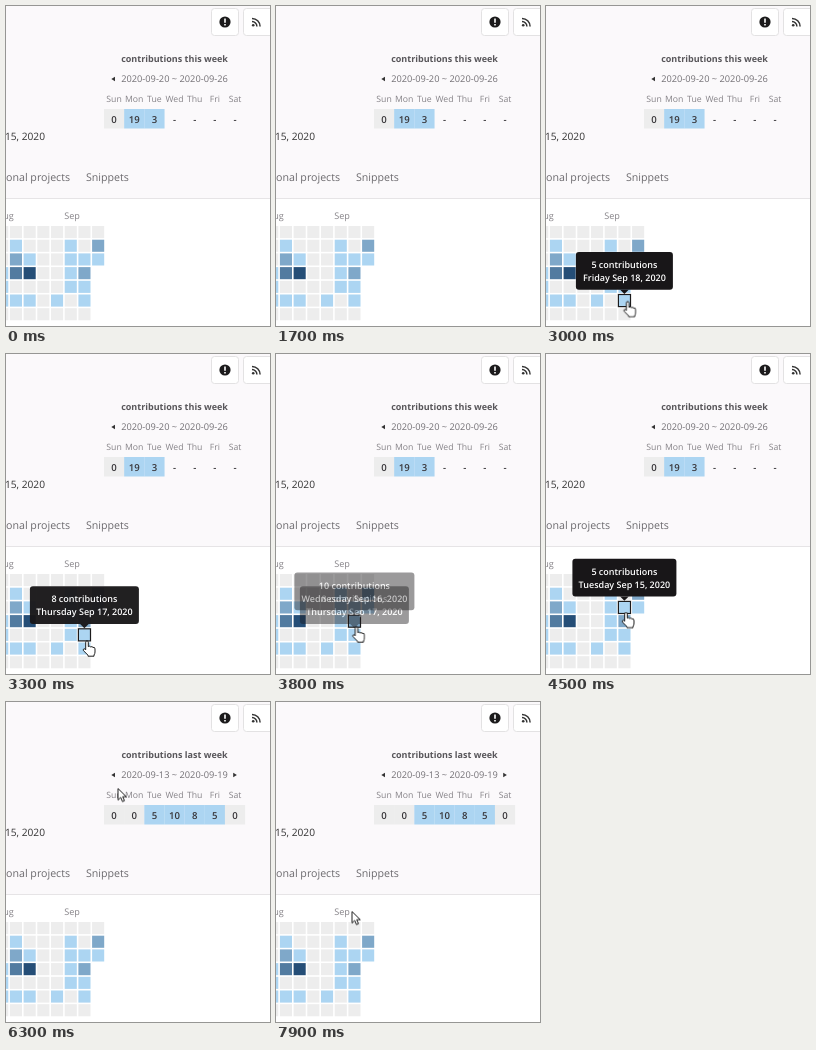
An HTML page for the animation above (8 s loop, 264 px wide and 320 px high).

```html
<!DOCTYPE html>
<html lang="en">
<head>
<meta charset="utf-8">
<title>Contribution calendar</title>
<style>
  html, body { margin: 0; width: 100%; height: 100%; overflow: hidden; background: #fff; }
  svg { display: block; width: 264px; height: 320px; }
  text { font-family: "Open Sans", "Noto Sans", sans-serif; text-rendering: geometricPrecision; }
  .button { fill: #fff; stroke: #e3e2e3; }
  .title { font-size: 9px; font-weight: 700; fill: #58565a; }
  .range { font-size: 9.25px; fill: #737075; }
  .day { font-size: 8.7px; fill: #858287; }
  .count { font-size: 9.6px; font-weight: 600; fill: #38363a; }
  .date { font-size: 10.2px; fill: #333; }
  .tab { font-size: 10.65px; fill: #6c6a6e; }
  .month { font-size: 9.1px; fill: #858287; }
  .tip { font-size: 9px; font-weight: 600; fill: #fff; }
  .mid { text-anchor: middle; }
  .end { text-anchor: end; }
  .pointer path { fill: #fff; stroke: #111; stroke-width: .95; stroke-linejoin: round; }
</style>
</head>
<body>
<svg id="stage" viewBox="0 0 264 320">
  <rect width="264" height="192" fill="#fbf9fb"/>
  <path d="M0 192.5H264" stroke="#e6e4e6"/>

  <rect class="button" x="205.5" y="2.5" width="27" height="27" rx="3"/>
  <rect class="button" x="237.5" y="2.5" width="30" height="27" rx="3"/>
  <circle cx="219" cy="16" r="5.6" fill="#1c1b1c"/>
  <path d="M219 12.6V16.8M219 18V19.6" stroke="#fff" stroke-width="1.6"/>
  <circle cx="247.2" cy="19.2" r="1.3" fill="#333"/>
  <path d="M246 15.6a4.9 4.9 0 0 1 4.9 4.9M246 12.4a8.1 8.1 0 0 1 8.1 8.1" fill="none" stroke="#333" stroke-width="1.5"/>

  <path d="M105.3 73L109 70.8V75.2z" fill="#333"/>
  <text class="date end" x="39" y="134">15, 2020</text>
  <text class="tab end" x="64" y="174.6">Personal projects</text>
  <text class="tab" x="80" y="174.6">Snippets</text>
  <text class="month end" x="7.8" y="213">Aug</text>
  <text class="month" x="58.2" y="213">Sep</text>
</svg>
<script>
const LOOP = 8000;
const PITCH = 13.7, CELL = 12.1, GRID_LEFT = -9.8, GRID_TOP = 220;
const SHADES = ['#ededed', '#acd5f2', '#7fa8c9', '#527ba0', '#254e77'];
const stage = document.getElementById('stage');

function add(parent, tag, attrs = {}, text = '') {
  const node = document.createElementNS('http://www.w3.org/2000/svg', tag);
  for (const key in attrs) node.setAttribute(key, attrs[key]);
  node.textContent = text;
  return parent.appendChild(node);
}

const label = (parent, cls, x, y, text) =>
  add(parent, 'text', { class: cls + ' mid', x, y }, text);

// Each stop is [ms, value, steps taken on the way to the next stop].
function track(node, prop, stops) {
  const all = stops[0][0] > 0 ? [[0, stops[0][1]], ...stops] : stops.slice();
  all.push([LOOP, all[all.length - 1][1]]);
  node.animate(all.map(([ms, value, steps = 1]) => ({
    offset: ms / LOOP, [prop]: value, easing: `steps(${steps}, end)`
  })), { duration: LOOP, iterations: Infinity });
}

// Weekly summary
const colWidth = 20.15;
const colMid = i => 98 + colWidth * (i + .5);
'Sun Mon Tue Wed Thu Fri Sat'.split(' ').forEach((day, i) => label(stage, 'day', colMid(i), 96.2, day));

function week(name, range, counts) {
  const group = add(stage, 'g');
  label(group, 'title', 168.5, 56.2, `contributions ${name} week`);
  label(group, 'range', 168.5, 76.2, range);
  counts.forEach((count, i) => {
    if (count !== '-') {
      add(group, 'rect', {
        x: 98 + colWidth * i, y: 103, width: colWidth + .1, height: 19.5,
        fill: SHADES[count > 0 ? 1 : 0]
      });
    }
    label(group, 'count', colMid(i), 116.6, count);
  });
  return group;
}

const thisWeek = week('this', '2020-09-20 ~ 2020-09-26', [0, 19, 3, '-', '-', '-', '-']);
const lastWeek = week('last', '2020-09-13 ~ 2020-09-19', [0, 0, 5, 10, 8, 5, 0]);
add(lastWeek, 'path', { d: 'M230.9 73L227.2 70.8V75.2z', fill: '#333' });
track(thisWeek, 'opacity', [[0, 1], [6000, 0]]);
track(lastWeek, 'opacity', [[0, 0], [6000, 1]]);

// Calendar: one string per week, one shade index per day
const cellBox = (col, row) => ({
  x: GRID_LEFT + col * PITCH, y: GRID_TOP + row * PITCH, width: CELL, height: CELL
});
['0001110', '0123010', '0014010', '0000000', '0000010', '0111100', '0012110', '021']
  .forEach((days, col) => [...days].forEach((shade, row) =>
    add(stage, 'rect', { ...cellBox(col, row), fill: SHADES[shade] })));

// Hovered days with tooltips; fadeIn and fadeOut are the opacities at a handover
const HOVER_COL = 6;
const hovers = [
  { row: 6, day: 'Saturday Sep 19', count: 'No', width: 108, from: 2300, to: 2500, fadeIn: .4, fadeOut: .26 },
  { row: 5, day: 'Friday Sep 18', count: 5, width: 97, from: 2500, to: 3200, fadeIn: .27, fadeOut: .43 },
  { row: 4, day: 'Thursday Sep 17', count: 8, width: 109, from: 3200, to: 3800, fadeIn: .43, fadeOut: .43 },
  { row: 3, day: 'Wednesday Sep 16', count: 10, width: 120, from: 3800, to: 4300, fadeIn: .43, fadeOut: .43 },
  { row: 2, day: 'Tuesday Sep 15', count: 5, width: 104, from: 4300, to: 5000, fadeIn: .43, fadeOut: .43 }
];

for (const { row, from, to } of hovers) {
  const outline = add(stage, 'rect', {
    ...cellBox(HOVER_COL, row), fill: 'none', stroke: '#1c1b1c', 'stroke-width': 1.2
  });
  track(outline, 'opacity', [[0, 0], [from, 1], [to, 0]]);
}

for (const { row, day, count, width, from, to, fadeIn, fadeOut } of hovers) {
  const mid = 78.4, y = GRID_TOP + (row + .5) * PITCH - .4;
  const tip = add(stage, 'g');
  add(tip, 'rect', { x: mid - width / 2, y: y - 49, width, height: 37.7, rx: 3, fill: '#181618' });
  add(tip, 'path', { d: `M${mid - 4.3} ${y - 11.3}h8.6l-4.3 4.3z`, fill: '#181618' });
  label(tip, 'tip', mid, y - 32.8, `${count} contributions`);
  label(tip, 'tip', mid, y - 20, `${day}, 2020`);
  const stops = [[0, 0], [from, fadeIn], [from + 100, .96], [to, fadeOut], [to + 100, 0]];
  if (from + 200 < to) stops.splice(3, 0, [from + 200, 1]);
  track(tip, 'opacity', stops);
}

// Pointer
const pointer = add(stage, 'g', { class: 'pointer' });
const hand = add(pointer, 'path', {
  d: 'M-1.3 8.5V1.2a1.3 1.3 0 0 1 2.6 0V5.6q1.2-1 2.4.3 1.4-.8 2.3.5 2-.4 2 1.5V11q0 1.5-1 3v1.2H1V14.2L-3.6 9.6q-.6-1.6.8-1.8.9 0 1.5 1z'
});
const arrow = add(pointer, 'path', { d: 'M0 0V11.5L2.7 9 4.5 13.1 6.5 12.2 4.7 8.2H8.3z' });

track(hand, 'opacity', [[0, 1], [5100, 0], [5600, 1], [6100, 0]]);
track(arrow, 'opacity', [[0, 0], [5100, 1], [5600, 0], [6100, 1]]);
track(pointer, 'opacity', [[0, 0], [2300, 1]]);
track(pointer, 'transform', [
  [2300, 81, 308, 2], [2500, 82, 300],
  [2900, 82, 300, 3], [3200, 81, 287],
  [3500, 81, 287, 3], [3800, 80.5, 273],
  [4100, 80.5, 273, 2], [4300, 80, 258.5],
  [4900, 80, 258.5, 8], [5700, 109, 73],
  [6000, 109, 73, 3], [6300, 112, 86.5, 2], [6500, 157, 121],
  [6600, 157, 121, 3], [6900, 190, 119],
  [7000, 190, 119, 3], [7300, 206, 119],
  [7400, 206, 119, 5], [7900, 76, 209.5]
].map(([ms, x, y, steps]) => [ms, `translate(${x}px, ${y}px)`, steps]));
</script>
</body>
</html>
```
